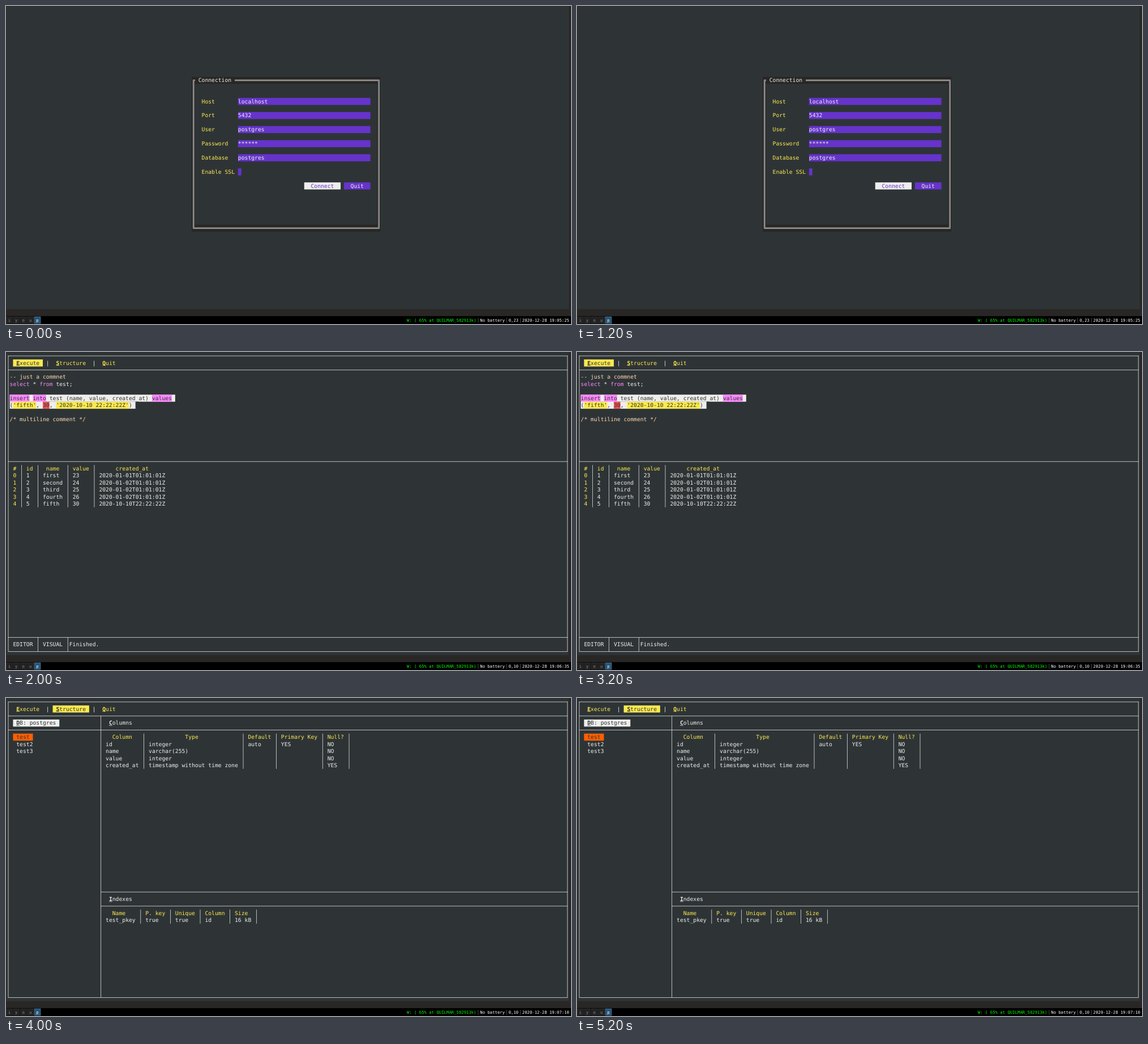
An HTML page with a canvas that plays this animation: 998 by 561 pixels, repeating every 6000 ms.

```html
<!DOCTYPE html>
<html lang="en">
<head>
<meta charset="utf-8">
<title>Database terminal</title>
<style>
  html, body { margin: 0; width: 100%; height: 100%; overflow: hidden; background: #292626; }
  canvas { display: block; }
</style>
</head>
<body>
<canvas id="stage" width="998" height="561"></canvas>
<script>
const ctx = document.getElementById('stage').getContext('2d');
const MONO = '"DejaVu Sans Mono", monospace';
// Everything is laid out on a 1366x768 desktop and scaled to the stage.
const SCREEN_W = 1366, SCREEN_H = 768, BAR_Y = 749;
const CELL_W = 8, CELL_H = 17, BORDER = 1, BASELINE = 13;
const COLS = 170, ROWS = 43;
const BG = '#2e3436', EDGE = '#292626', FG = '#eeeeec', YELLOW = '#fce94f';
const PURPLE = '#6633cc', PINK = '#ff87ff', RED = '#ef5555', PEACH = '#ffd7af', ORANGE = '#ff5f00';

const colX = c => BORDER + c * CELL_W;
const rowY = r => BORDER + r * CELL_H;
const lineX = c => colX(c) + 4;
const lineY = r => rowY(r) + 8;

function rect(x, y, w, h, color) {
  ctx.fillStyle = color;
  ctx.fillRect(x, y, w, h);
}

function cells(row, col, width, color, height = 1) {
  rect(colX(col), rowY(row), width * CELL_W, height * CELL_H, color);
}

function put(row, col, text, color = FG, bold = false) {
  ctx.font = `${bold ? 'bold ' : ''}13.29px ${MONO}`;
  ctx.fillStyle = color;
  ctx.fillText(text, colX(col), rowY(row) + BASELINE);
}

// First letter is the shortcut: bold and underlined.
function hotkey(row, col, text, color) {
  put(row, col, text[0], color, true);
  put(row, col + 1, text.slice(1), color);
  rect(colX(col), rowY(row) + BASELINE + 1, CELL_W, 1, color);
}

function hline(row, from, to) {
  rect(lineX(from), lineY(row), lineX(to) - lineX(from) + 1, 1, FG);
}

function vline(col, y0, y1) {
  rect(lineX(col), y0, 1, y1 - y0, FG);
}

function frame() {
  [0, 2, 42].forEach(row => hline(row, 0, 169));
  [0, 169].forEach(col => vline(col, lineY(0), lineY(42)));
}

function menu(active) {
  [['Execute', 3], ['Structure', 15], ['Quit', 29]].forEach(([label, col]) => {
    const on = label === active;
    if (on) cells(1, col - 1, label.length + 2, YELLOW);
    hotkey(1, col, label, on ? BG : YELLOW);
  });
  put(1, 12, '|');
  put(1, 26, '|');
}

function table(row, heads, seps, cols, rows) {
  heads.forEach(([col, text]) => put(row, col, text, YELLOW));
  rows.forEach((values, i) => values.forEach((v, j) => put(row + 1 + i, cols[j], v)));
  seps.forEach(col => vline(col, rowY(row), rowY(row + 1 + rows.length)));
}

function doubleFrame(r0, c0, r1, c1, gapFrom, gapTo) {
  ctx.strokeStyle = FG;
  ctx.lineWidth = 1;
  for (const inset of [-1, 1]) {
    const left = lineX(c0) + 0.5 + inset, right = lineX(c1) + 0.5 - inset;
    const top = lineY(r0) + 0.5 + inset, bottom = lineY(r1) + 0.5 - inset;
    ctx.beginPath();
    ctx.moveTo(colX(gapFrom), top);
    ctx.lineTo(left, top);
    ctx.lineTo(left, bottom);
    ctx.lineTo(right, bottom);
    ctx.lineTo(right, top);
    ctx.lineTo(colX(gapTo), top);
    ctx.stroke();
  }
}

function connection() {
  cells(10, 56, 57, EDGE, 22);
  cells(11, 57, 55, BG, 20);
  doubleFrame(10, 56, 31, 112, 57, 69);
  put(10, 58, 'Connection');
  const fields = [['Host', 'localhost'], ['Port', '5432'], ['User', 'postgres'],
    ['Password', '******'], ['Database', 'postgres'], ['Enable SSL', '']];
  fields.forEach(([label, value], i) => {
    const row = 13 + 2 * i;
    put(row, 59, label, YELLOW);
    cells(row, 70, value ? 40 : 1, PURPLE);
    put(row, 70, value);
  });
  cells(25, 90, 11, FG);
  put(25, 92, 'Connect', PURPLE);
  cells(25, 102, 8, PURPLE);
  put(25, 104, 'Quit');
}

function selected(row, parts) {
  const width = parts.reduce((n, [text]) => n + text.length, 0);
  cells(row, 1, width, FG);
  let col = 1;
  for (const [text, bg] of parts) {
    if (bg) cells(row, col, text.length, bg);
    put(row, col, text, BG);
    col += text.length;
  }
}

function editor() {
  frame();
  menu('Execute');
  put(3, 1, '-- just a commnet', PEACH);
  put(4, 1, 'select', PINK);
  put(4, 8, '*');
  put(4, 10, 'from', PINK);
  put(4, 15, 'test;');
  selected(6, [['insert', PINK], [' '], ['into', PINK],
    [' test (name, value, created_at) '], ['values', PINK], [' ']]);
  selected(7, [['('], ["'fifth'", YELLOW], [', '], ['30', RED], [', '],
    ["'2020-10-10 22:22:22Z'", YELLOW], [') ']]);
  put(9, 1, '/* multiline comment */', PEACH);
  hline(15, 0, 169);

  const rows = [
    ['1', 'first', '23', '2020-01-01T01:01:01Z'],
    ['2', 'second', '24', '2020-01-02T01:01:01Z'],
    ['3', 'third', '25', '2020-01-02T01:01:01Z'],
    ['4', 'fourth', '26', '2020-01-02T01:01:01Z'],
    ['5', 'fifth', '30', '2020-10-10T22:22:22Z']];
  table(16, [[2, '#'], [6, 'id'], [12, 'name'], [20, 'value'], [33, 'created_at']],
    [4, 9, 18, 26], [6, 11, 20, 28], rows);
  rows.forEach((_, i) => put(17 + i, 2, String(i), YELLOW));

  hline(40, 0, 169);
  [9, 18].forEach(col => vline(col, lineY(40), lineY(42)));
  put(41, 2, 'EDITOR');
  put(41, 11, 'VISUAL');
  put(41, 19, 'Finished.');
}

function structure() {
  frame();
  menu('Structure');
  hline(4, 0, 169);
  vline(28, lineY(2), lineY(42));
  cells(3, 2, 14, FG);
  hotkey(3, 3, 'DB: postgres', BG);
  cells(5, 2, 6, ORANGE);
  put(5, 3, 'test', BG);
  put(6, 3, 'test2');
  put(7, 3, 'test3');

  hotkey(3, 31, 'Columns', FG);
  table(5, [[32, 'Column'], [54, 'Type'], [73, 'Default'], [83, 'Primary Key'], [97, 'Null?']],
    [41, 71, 81, 95, 103], [30, 43, 73, 83, 97], [
      ['id', 'integer', 'auto', 'YES', 'NO'],
      ['name', 'varchar(255)', '', '', 'NO'],
      ['value', 'integer', '', '', 'NO'],
      ['created_at', 'timestamp without time zone', '', '', 'YES']]);

  hline(27, 28, 169);
  hotkey(28, 31, 'Indexes', FG);
  hline(29, 28, 169);
  table(30, [[32, 'Name'], [42, 'P. key'], [51, 'Unique'], [60, 'Column'], [69, 'Size']],
    [40, 49, 58, 67, 75], [30, 42, 51, 60, 69],
    [['test_pkey', 'true', 'true', 'id', '16 kB']]);
}

function statusBar(load, clock) {
  const charW = 6, gap = 9, baseline = BAR_Y + 13;
  rect(0, BAR_Y, SCREEN_W, SCREEN_H - BAR_Y, '#000000');
  ctx.font = `9.967px ${MONO}`;
  const write = (text, x, color) => {
    ctx.fillStyle = color;
    ctx.fillText(text, x, baseline);
  };
  [...'iyoup'].forEach((name, i) => {
    const x = 17 * i, on = name === 'p';
    rect(x, BAR_Y + 1, 16, 17, on ? '#4c7899' : '#333333');
    rect(x + 1, BAR_Y + 2, 14, 15, on ? '#285577' : '#222222');
    write(name, x + 5, on ? '#ffffff' : '#888888');
  });

  // Status blocks are stacked from the right edge.
  let x = SCREEN_W - 4;
  const blocks = [clock, load, 'No battery', 'W: ( 65% at QUILMAR_582913k)'];
  blocks.forEach((text, i) => {
    if (i) {
      x -= gap;
      rect(x + 4, BAR_Y + 4, 1, 12, '#666666');
    }
    x -= text.length * charW;
    write(text, x, text.startsWith('W:') ? '#00ff00' : '#ffffff');
  });
}

const scenes = [
  [connection, '0,23', '2020-12-28 19:05:25'],
  [editor, '0,10', '2020-12-28 19:06:35'],
  [structure, '0,10', '2020-12-28 19:07:10']];
const HOLD = 2000;

function render(time) {
  const [draw, load, clock] = scenes[Math.floor(time / HOLD) % scenes.length];
  ctx.setTransform(998 / SCREEN_W, 0, 0, 561 / SCREEN_H, 0, 0);
  ctx.textRendering = 'geometricPrecision';
  rect(0, 0, SCREEN_W, SCREEN_H, EDGE);
  cells(0, 0, COLS, BG, ROWS);
  draw();
  statusBar(load, clock);
}

const start = performance.now();
function tick() {
  render(performance.now() - start);
  requestAnimationFrame(tick);
}
tick();
</script>
</body>
</html>
```
